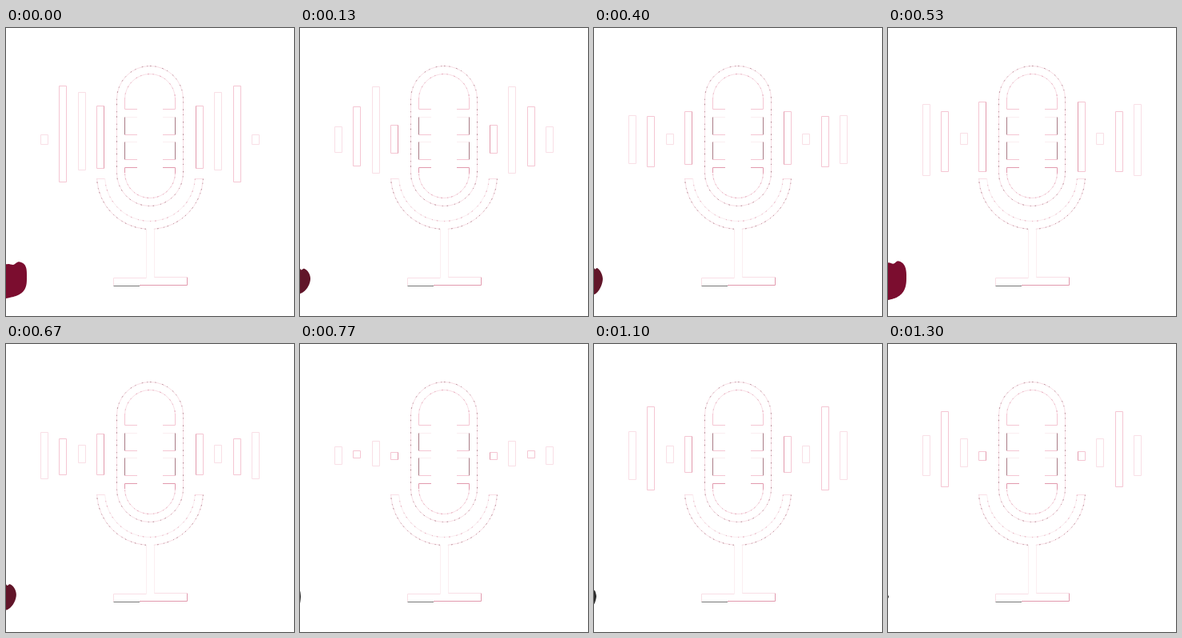
Animation of 360 by 360 pixels, one loop 1330 ms. Source, as an HTML page with a canvas:

```html
<!DOCTYPE html>
<html lang="en">
<head>
<meta charset="utf-8">
<title>Microphone</title>
<style>
  html, body { margin: 0; width: 100%; height: 100%; overflow: hidden; background: #fff; }
  canvas { display: block; width: 360px; height: 360px; }
</style>
</head>
<body>
<canvas id="stage" width="360" height="360"></canvas>
<script>
const ctx = document.getElementById('stage').getContext('2d');
const LOOP = 1330, STEPS = 24, TAU = 2 * Math.PI;
const POSE_TIMES = [0, 130, 270, 530, 770, 970, 1300];

const MIST = '#fbeef1', PALE = '#f9dfe6', PINK = '#f5c6d3', ROSE = '#e29aae', WINE = '#ab7d88', DARK = '#777';

// Half heights at the pose times; the middle of a bar depends on time and height.
const BARS = [
  { x: 43, halves: [6, 16, 20, 44.5, 11, 32, 25], middle: () => 139, outer: PALE, inner: PALE },
  { x: 66, halves: [60, 37, 26.5, 37.5, 4.5, 54.5, 47],
    middle: t => 136 + 6 * Math.sin(TAU * (t - 150) / LOOP), outer: PINK, inner: PINK },
  { x: 90, halves: [48.5, 54, 6, 7, 15.5, 7.5, 17.5], middle: (t, h) => 140 - 0.24 * h, outer: PALE, inner: PALE },
  { x: 113, halves: [39, 17.5, 25, 43.5, 4.5, 31.5, 5.5], middle: (t, h) => 140 - 0.1 * h, outer: PINK, inner: ROSE }
];
const BLOB = { reach: [26, 13, 2, 23, 1, 4, 1], halves: [22, 16, 12, 24, 8, 13, 2] };

function pose(values, t) {
  const i = POSE_TIMES.findLastIndex(time => time <= t);
  const next = (i + 1) % values.length;
  const end = POSE_TIMES[next] || LOOP;
  const u = (t - POSE_TIMES[i]) / (end - POSE_TIMES[i]);
  return values[i] + (values[next] - values[i]) * u;
}

// The picture holds between steps, and every key pose is shown exactly.
function hold(t) {
  const key = POSE_TIMES.findLast(time => time <= t);
  const step = LOOP / STEPS;
  return key + Math.floor((t - key) / step) * step;
}

function line(color, ...p) {
  ctx.strokeStyle = color;
  ctx.beginPath();
  for (let i = 0; i < p.length; i += 2) ctx.lineTo(p[i], p[i + 1]);
  ctx.stroke();
}

// A faint curve with darker flecks along it.
function fleck(path, base, dots, gap) {
  ctx.strokeStyle = base;
  ctx.stroke(path);
  ctx.strokeStyle = dots;
  ctx.setLineDash([1.5, gap, 1, gap * 1.6]);
  ctx.stroke(path);
  ctx.setLineDash([]);
}

function arc(y, radius, from, to) {
  const path = new Path2D();
  path.arc(180, y, radius, from, to);
  return path;
}

function bar(x, top, bottom, left, right, cap) {
  const l = x + 0.5, r = x + 9.5;
  const t = Math.round(top) + 0.5, b = Math.round(bottom) + 0.5;
  line(cap, l, t, r, t);
  line(cap, l, b, r, b);
  line(left, l, t, l, b);
  line(right, r, t, r, b);
}

function drawBars(t) {
  for (const { x, halves, middle, outer, inner } of BARS) {
    const half = pose(halves, t), y = middle(t, half);
    bar(x, y - half, y + half, outer, inner, outer);
    bar(350 - x, y - half, y + half, inner, outer, outer);
  }
}

function drawCapsule() {
  const shell = new Path2D();
  shell.roundRect(138.5, 47.5, 83, 175, 41.5);
  fleck(shell, PALE, WINE, 5);
  fleck(arc(89, 31.5, Math.PI, 0), PALE, ROSE, 5);
  fleck(arc(181, 31.5, 0, Math.PI), PALE, ROSE, 4);

  for (const side of [-1, 1]) {
    const edge = 180 + side * 31.5, tip = 180 + side * 16;
    line(PINK, edge, 87, edge, 101.5, tip, 101.5);
    for (const y of [111.5, 142.5]) {
      line(MIST, tip, y, edge, y);
      line(WINE, edge, y, edge, y + 22);
      line(PINK, edge, y + 22, tip, y + 22);
    }
    line(ROSE, tip, 174.5, edge, 174.5, edge, 181);
  }
}

function drawStand() {
  fleck(arc(185, 66.5, 0.05, Math.PI / 2 - 0.075), PALE, WINE, 4);
  fleck(arc(185, 66.5, Math.PI / 2 + 0.075, Math.PI - 0.05), PALE, WINE, 4);
  fleck(arc(185, 56.5, 0.06, Math.PI - 0.06), MIST, ROSE, 5);
  for (const x of [113.5, 236.5]) line(PALE, x, 188.5, x + 10, 188.5);

  line(MIST, 175.5, 251.5, 175.5, 312);
  line(MIST, 185.5, 251.5, 185.5, 312);
  line(PALE, 175.5, 312.5, 134.5, 312.5, 134.5, 322);
  line(DARK, 134.5, 322.5, 167, 322.5);
  line(ROSE, 167, 321.5, 226.5, 321.5, 226.5, 311.5);
  line(PALE, 226.5, 311.5, 185.5, 311.5);
}

// Rounded square when wide, ellipse when thin, with one notch near its top.
function drawBlob(t) {
  const reach = pose(BLOB.reach, t), half = pose(BLOB.halves, t);
  const power = 1.6 - reach / 26;
  ctx.fillStyle = reach > 16 ? '#7b0d2f' : reach > 6 ? '#611529' : '#2b2b2b';
  ctx.beginPath();
  for (let a = -Math.PI / 2; a <= Math.PI / 2; a += 0.04) {
    const notch = 1 - 0.16 * Math.exp(-(((a + 1.4) / 0.16) ** 2));
    const x = reach * Math.abs(Math.cos(a)) ** power;
    const y = half * notch * Math.sign(a) * Math.abs(Math.sin(a)) ** power;
    ctx.lineTo(x, 316 + y - 0.2 * x);
  }
  ctx.lineTo(0, 316 + half);
  ctx.fill();
}

function render(now) {
  const t = hold(now % LOOP);
  ctx.fillStyle = '#fff';
  ctx.fillRect(0, 0, 360, 360);
  ctx.lineWidth = 1;
  drawBars(t);
  drawCapsule();
  drawStand();
  drawBlob(t);
}

let start;
function loop(now) {
  start ??= now;
  render(Math.max(0, now - start));
  requestAnimationFrame(loop);
}
render(0);
requestAnimationFrame(loop);
</script>
</body>
</html>
```
